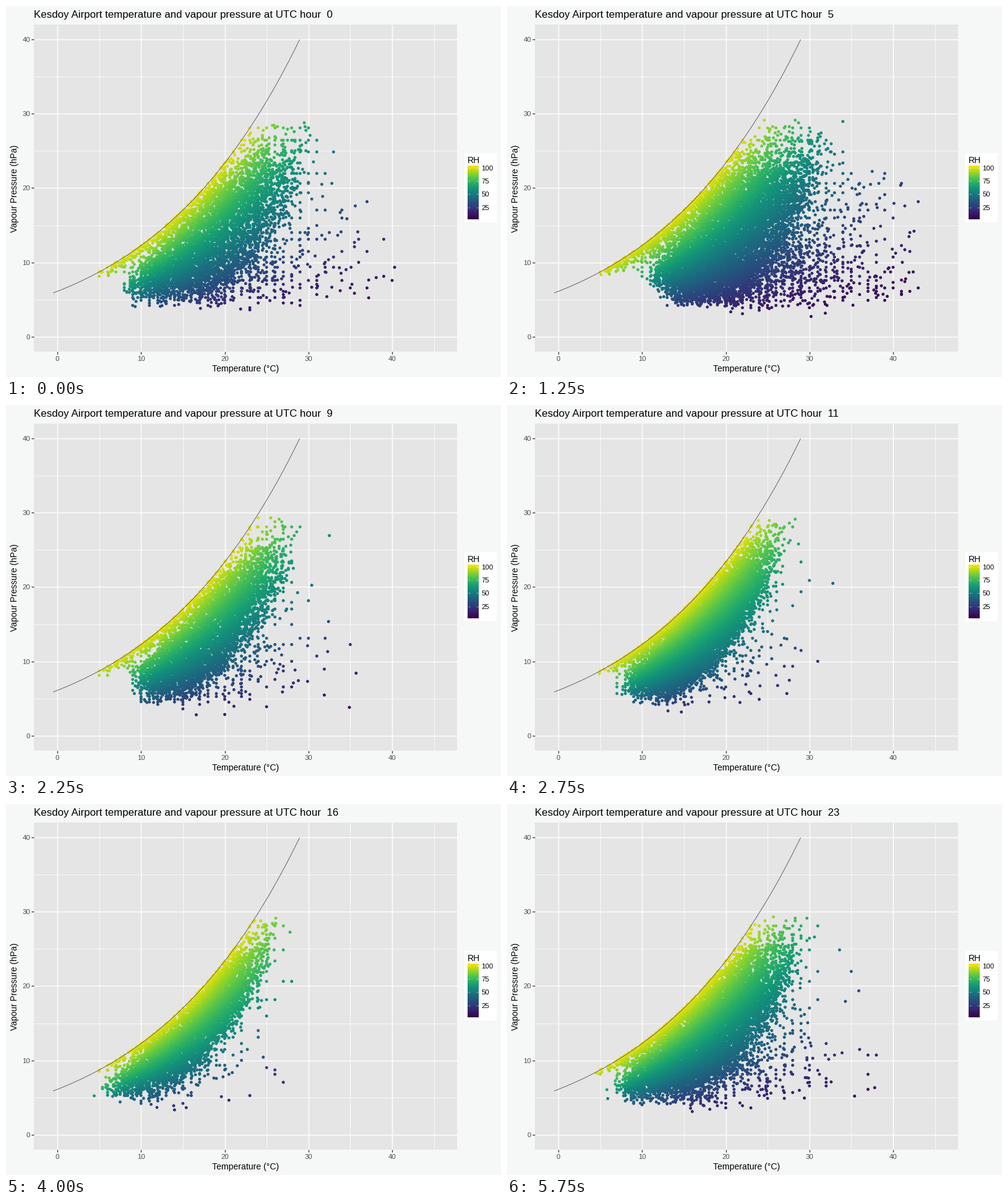
Animation, 800 px wide and 600 px high, one loop 6 s. Source, as a matplotlib script:

```python
import numpy as np
import matplotlib.pyplot as plt
from matplotlib.animation import FuncAnimation
from matplotlib.colors import ListedColormap
from matplotlib.patches import Rectangle

W, H, DPI = 800, 600, 100
PX = 72 / DPI
LEFT, TOP, RIGHT, BOTTOM = 45, 30, 729, 559
HOURS = 24
RH_MIN, RH_MAX = 2.7, 103

plt.rcParams["font.family"] = "Liberation Sans"

# Viridis, slightly deepened
CMAP = ListedColormap(plt.get_cmap("viridis")(np.linspace(0, 1, 256))[:, :3] ** 1.2)


def px(temp):
    return 83 + 13.525 * np.asarray(temp)


def py(pressure):
    return 535 - 12.03 * np.asarray(pressure)


def saturation(temp):
    return 6.112 * np.exp(17.67 * temp / (temp + 243.5))


def warmth(hour):
    """Daily heating: 1 in the early afternoon (about 4 UTC), 0 at night."""
    away = (hour - 3.7 + 12) % 24 - 12
    return np.exp(-(away / 5.6) ** 2)


def bulk_range(dew, hour):
    """Usual lowest and highest temperature for a dew point."""
    w = warmth(hour)
    d = np.maximum(dew, 0)
    lag = 1.8 * np.sin(2 * np.pi * (hour - 5) / 24)
    low = d + (5.2 + 8 * w + lag) * np.exp(-d / 7)
    high = d + 12.8 + 8.9 * w - d * (.42 + .1 * w)
    return low, high


def readings(hour):
    """Temperature, vapour pressure and humidity for one hour of the day."""
    rng = np.random.default_rng(100 + hour)
    w = warmth(hour)
    synoptic = hour % 3 == 2
    n = 16000 if synoptic else 11000

    # Dew point follows the season; hot days are often dry
    season = np.sin(rng.uniform(0, 2 * np.pi, n))
    dew = (11.4 - 1.1 * w + (6 + w) * season
           + (3 - .5 * season) * rng.standard_normal(n))
    hot = rng.random(n) < .02 + .1 * w ** 2
    dry = hot & (rng.random(n) < .6)
    dew = np.where(dry, rng.normal(4, 4.5, n), dew)

    low, high = bulk_range(dew, hour)
    temp = low + (high - low) * 1.12 * rng.beta(1.8, 2.2, n) + rng.normal(0, .7, n)
    wet = rng.random(n) < .12 * np.clip((dew - 4) / 6, 0, 1)
    temp = np.where(wet, dew + rng.exponential(1.3, n), temp)
    reach = (2.8 + 3.2 * w) * np.clip(1 - .03 * dew, .4, 1)
    temp = np.where(hot, high - 1.5 + rng.exponential(reach), temp)
    temp = dew + np.abs(temp - dew)

    # Some readings are in whole degrees, the rest in tenths
    whole = rng.random(n) < (.4 if synoptic else .5)
    temp = np.where(whole, np.round(temp), np.round(temp, 1))
    dew = np.where(whole, np.round(dew), np.round(dew, 1))
    keep = ((dew <= temp) & (dew < 23.8) & (dew > np.where(hot, -12, -6))
            & (temp <= 32 + 13 * w))
    temp, dew = np.unique(np.column_stack([temp, dew])[keep], axis=0).T
    pressure = saturation(dew)
    return temp, pressure, 100 * pressure / saturation(temp)


fig = plt.figure(figsize=(W / DPI, H / DPI), dpi=DPI, facecolor="#f6f8f7")
ax = fig.add_axes([0, 0, 1, 1])
ax.axis("off")


def box(x0, y0, x1, y1, color):
    ax.add_patch(Rectangle((x0, y0), x1 - x0, y1 - y0, fc=color, lw=0, zorder=0))


def line(xs, ys, color, width, z=1):
    ax.plot(xs, ys, color=color, lw=width * PX, zorder=z,
            solid_capstyle="butt")


def label(x, y, text, size, color="black", **kw):
    return ax.text(x, y, text, fontsize=size * PX, color=color,
                   va="baseline", **kw)


# Panel and grid
box(LEFT, TOP, RIGHT, BOTTOM, "#e5e5e5")
for v in range(5, 50, 10):
    line([px(v)] * 2, [TOP, BOTTOM], "white", .7)
    if v < 40:
        line([LEFT, RIGHT], [py(v)] * 2, "white", .7)
for v in range(0, 50, 10):
    x, y = px(v), py(v)
    line([x, x], [TOP, BOTTOM], "white", 1.45)
    line([LEFT, RIGHT], [y, y], "white", 1.45)
    line([x, x], [BOTTOM, BOTTOM + 3.7], "#333333", 1.3)
    line([LEFT - 3.7, LEFT], [y, y], "#333333", 1.3)
    label(x, 574, str(v), 11.4, "#4d4d4d", ha="center")
    label(39, y + 4, str(v), 11.4, "#4d4d4d", ha="right")

title = label(45, 19, "", 16.9)
label(387, 591, "Temperature (°C)", 14, ha="center")
label(18, 295, "Vapour Pressure (hPa)", 13.9, ha="center",
      rotation=90, rotation_mode="anchor")

# Legend
box(741, 238, 793, 350, "white")
label(746, 254, "RH", 14)
ax.imshow(np.linspace(1, 0, 256)[:, None], cmap=CMAP, aspect="auto",
          extent=(746.3, 763.5, 345.3, 259), zorder=2)
for v in (25, 50, 75, 100):
    y = 345 - 86 * (v - RH_MIN) / (RH_MAX - RH_MIN)
    line([746.5, 750], [y, y], "white", .5, 3)
    line([760, 763.5], [y, y], "white", .5, 3)
    label(768.5, y + 4, str(v), 11.4)

# Saturation curve and readings
t = np.linspace(-.5, 28.95, 101)
line(px(t), py(saturation(t)), "#666666", 1, 5)
dots = ax.scatter([], [], s=(4.9 * PX) ** 2, c=[], cmap=CMAP,
                  vmin=RH_MIN, vmax=RH_MAX, linewidths=0, zorder=4)
ax.set_xlim(0, W)
ax.set_ylim(H, 0)


def update(hour):
    temp, pressure, humidity = readings(hour)
    dots.set_offsets(np.column_stack([px(temp), py(pressure)]))
    dots.set_array(humidity)
    title.set_text("Kesdoy Airport temperature and vapour pressure "
                   f"at UTC hour  {hour}")
    return dots, title


anim = FuncAnimation(fig, update, frames=HOURS, interval=250,
                     init_func=lambda: update(0), repeat=True)
plt.show()
```
